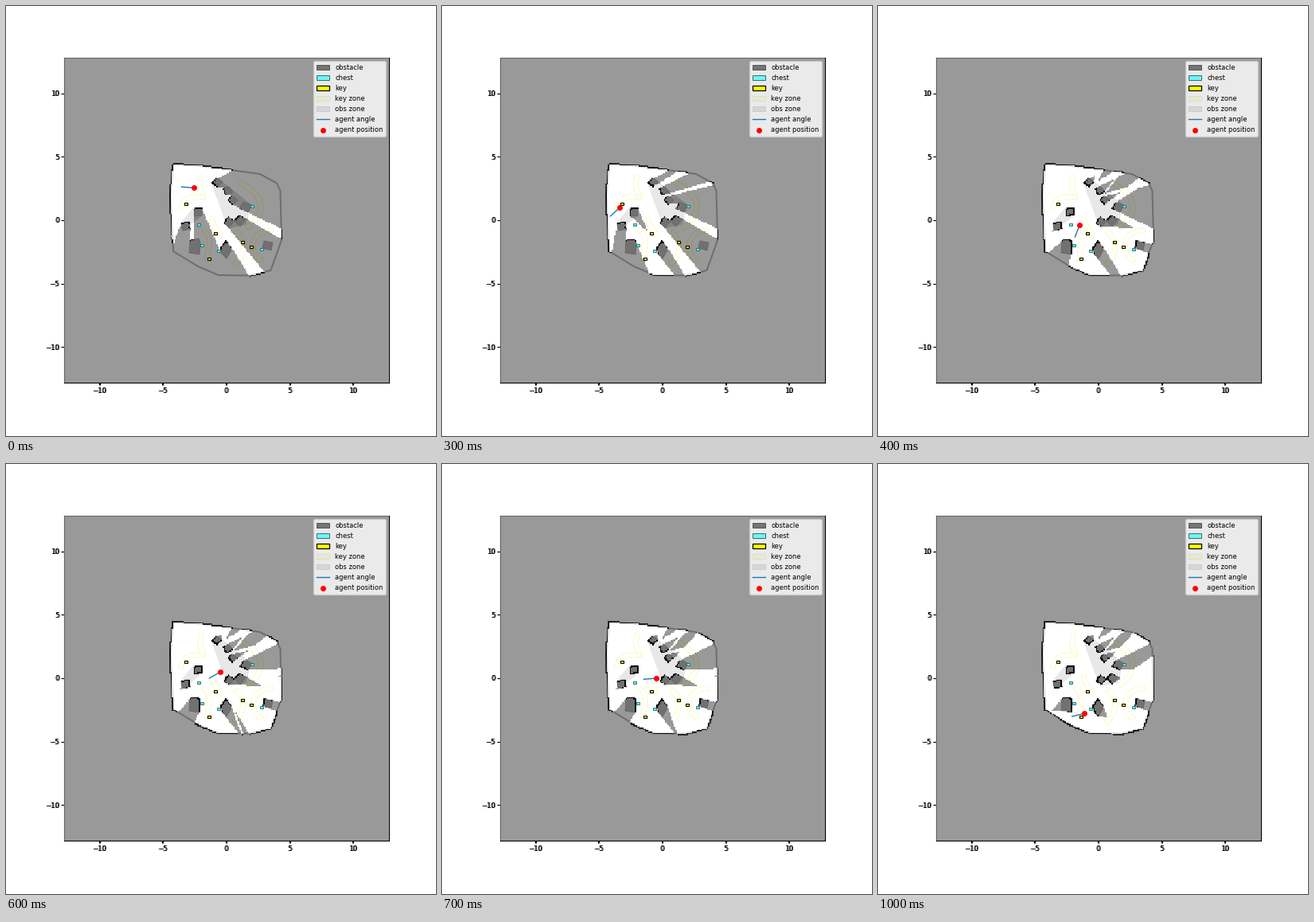
Write a matplotlib script that moves like this. It is 540 px wide and 540 px high and loops after 1100 ms.

```python
import numpy as np
import matplotlib.pyplot as plt
from matplotlib.animation import FuncAnimation
from matplotlib.lines import Line2D
from matplotlib.patches import Patch, Polygon, Rectangle
from matplotlib.path import Path

SIZE = 540
LEFT, RIGHT, TOP, BOTTOM = 73, 481, 65, 473
CELLS = 256
CELL = (RIGHT - LEFT) / CELLS
UNIT = 10 * CELL
ORIGIN = (277, 269)

# Layout is in stage pixels, with y pointing down.
WALL = [(210, 199), (240, 200.5), (283, 206), (319, 211), (340, 222.5),
        (344.5, 232), (346, 294), (332.5, 332), (306, 338.5), (267, 338),
        (241, 327), (210, 308), (206.5, 238)]

OBSTACLES = [
    [(258, 222), (264, 215), (272, 221), (265, 228)],
    [(272, 229), (280, 227), (285, 234), (276, 238)],
    [(278, 244), (284, 238), (291, 244), (284, 250)],
    [(293, 255), (298, 246), (308, 250), (304, 259)],
    [(273, 272), (279, 264), (287, 270), (280, 278)],
    [(286, 269), (293, 262), (301, 268), (294, 277)],
    [(236, 254), (246, 253), (246, 263), (236, 264)],
    [(219, 273), (230, 270), (232, 280), (222, 282)],
    [(231, 294), (242, 292), (244, 297), (243, 312), (230, 310)],
    [(269, 304), (276, 294), (284, 305), (277, 317), (271, 311)],
    [(324, 295), (335, 297), (333, 307), (322, 304)],
]

OBS_ZONES = [
    [(258, 222), (264, 215), (308, 250), (301, 274), (279, 279)],
    [(219, 273), (236, 253), (246, 253), (246, 263), (222, 282)],
]

# Cubic Bezier centre lines of the key zones.
KEY_ZONES = [
    [(219, 256), (224, 238), (232, 240), (250, 240)],
    [(246, 213), (240, 228), (246, 230), (249, 242)],
    [(247, 281), (262, 290), (252, 305), (253, 320)],
    [(259, 265), (257, 278), (270, 280), (268, 290)],
    [(292, 221), (330, 240), (325, 262), (302, 279)],
    [(288, 283), (302, 295), (300, 315), (286, 325)],
    [(335, 282), (300, 282), (308, 318), (323, 319)],
]

CHESTS = [(309, 251), (241.5, 274), (246, 300.5), (267, 307), (321, 305)]
KEYS = [(225.5, 248), (263, 285), (254.5, 317), (297, 296), (308, 302)]

# Agent x, y and heading in degrees for each tenth of a second.
POSES = [(236.3, 228.3, 176), (226.3, 253, 173), (226.3, 253, 173),
         (223.3, 253.2, 222), (253.3, 275.2, 248), (269.2, 253.2, 232),
         (269.2, 261, 210), (269.2, 269, 185), (266, 284, 188),
         (262.5, 299, 191), (259.2, 313.2, 194)]


def band(ctrl, half=3):
    """Outline of a strip along a cubic Bezier curve."""
    p = np.array(ctrl, float)
    t = np.linspace(0, 1, 40)[:, None]
    s = 1 - t
    mid = s**3 * p[0] + 3 * s * s * t * p[1] + 3 * s * t * t * p[2] + t**3 * p[3]
    d = np.gradient(mid, axis=0)
    normal = np.c_[-d[:, 1], d[:, 0]] / np.hypot(d[:, 0], d[:, 1])[:, None]
    return np.r_[mid + half * normal, (mid - half * normal)[::-1]]


def solid_cells():
    c = np.arange(CELLS) + 0.5
    x, y = np.meshgrid(LEFT + c * CELL, TOP + c * CELL)
    pts = np.c_[x.ravel(), y.ravel()]
    solid = ~Path(WALL + WALL[:1]).contains_points(pts)
    for shape in OBSTACLES:
        solid |= Path(shape + shape[:1]).contains_points(pts)
    return solid.reshape(CELLS, CELLS)


def cell_index(pos, start):
    return np.clip(((pos - start) / CELL).astype(int), 0, CELLS - 1)


def scan(x, y, solid, seen, rays=720):
    """Mark the cells each ray crosses, up to the first solid one."""
    a = np.arange(rays) * 2 * np.pi / rays
    r = np.arange(0, 190, 0.5)[:, None]
    col = cell_index(x + r * np.cos(a), LEFT)
    row = cell_index(y + r * np.sin(a), TOP)
    first = solid[row, col].argmax(axis=0)
    lit = np.arange(len(r))[:, None] <= first
    seen[row[lit], col[lit]] = True


def build_maps():
    solid = solid_cells()
    seen = np.zeros_like(solid)
    maps = []
    for x, y, _ in POSES:
        scan(x, y, solid, seen)
        maps.append(np.where(seen, np.where(solid, 0.0, 1.0), 0.5))
    return maps


def add_axes(dx=0):
    rect = (LEFT + dx, SIZE - BOTTOM, RIGHT - LEFT, BOTTOM - TOP)
    ax = fig.add_axes([v / SIZE for v in rect])
    ax.set(xlim=(LEFT, RIGHT), ylim=(BOTTOM, TOP))
    values = np.arange(-10, 11, 5)
    names = [str(v).replace("-", "\u2212") for v in values]
    ax.set_xticks(ORIGIN[0] + values * UNIT, names)
    ax.set_yticks(ORIGIN[1] - values * UNIT, names)
    ax.tick_params(labelsize=6, length=2, pad=2)
    return ax


plt.rcParams["font.family"] = "DejaVu Sans"
fig = plt.figure(figsize=(SIZE / 100, SIZE / 100), dpi=100, facecolor="white")

# The tick labels show a slight double print.
ghost = add_axes(-1)
for side in ghost.spines.values():
    side.set_visible(False)
ax = add_axes()

for shape in OBS_ZONES:
    ax.add_patch(Polygon(shape, fc="#909090", ec="#707070", lw=0.5, zorder=1))
for ctrl in KEY_ZONES:
    ax.add_patch(Polygon(band(ctrl), fc=(1, 1, 0.5, 0.12), ec="#f0e800",
                         lw=0.7, zorder=2))
ax.add_patch(Polygon(WALL, fill=False, ec="#303030", lw=1.5, zorder=3))
for shape in OBSTACLES:
    ax.add_patch(Polygon(shape, fc="#363636", ec="black", lw=0.6, zorder=3))

maps = build_maps()
fog = ax.imshow(maps[0], cmap="gray", vmin=0, vmax=1, alpha=0.8,
                extent=(LEFT, RIGHT, BOTTOM, TOP), interpolation="nearest",
                aspect="auto", zorder=4)

for items, face, edge, lw in ((CHESTS, "#5cf0f0", "#206868", 0.6),
                              (KEYS, "yellow", "black", 0.8)):
    for x, y in items:
        ax.add_patch(Rectangle((x - 2, y - 1.5), 4, 3, fc=face, ec=edge,
                               lw=lw, zorder=5))

heading, = ax.plot([], [], color="C0", lw=1, zorder=6)
agent, = ax.plot([], [], "o", color="red", ms=4, zorder=7)

handles = [
    Patch(fc="#757575", ec="#555555", lw=0.7, label="obstacle"),
    Patch(fc="#70f4f4", ec="#307070", lw=0.7, label="chest"),
    Patch(fc="yellow", ec="black", lw=0.9, label="key"),
    Patch(fc="#e8e8d6", ec="#dedec4", lw=0.7, label="key zone"),
    Patch(fc="#d6d6d6", ec="#cccccc", lw=0.7, label="obs zone"),
    Line2D([], [], color="C0", lw=1, label="agent angle"),
    Line2D([], [], color="red", marker="o", ms=4, ls="", label="agent position"),
]
ax.legend(handles=handles, loc="upper right", fontsize=6).set_zorder(8)


def update(i):
    x, y, deg = POSES[i]
    a = np.radians(deg)
    fog.set_data(maps[i])
    heading.set_data([x, x + UNIT * np.cos(a)], [y, y - UNIT * np.sin(a)])
    agent.set_data([x], [y])
    return fog, heading, agent


anim = FuncAnimation(fig, update, frames=len(POSES), interval=100,
                     repeat=True, repeat_delay=0)
plt.show()
```
